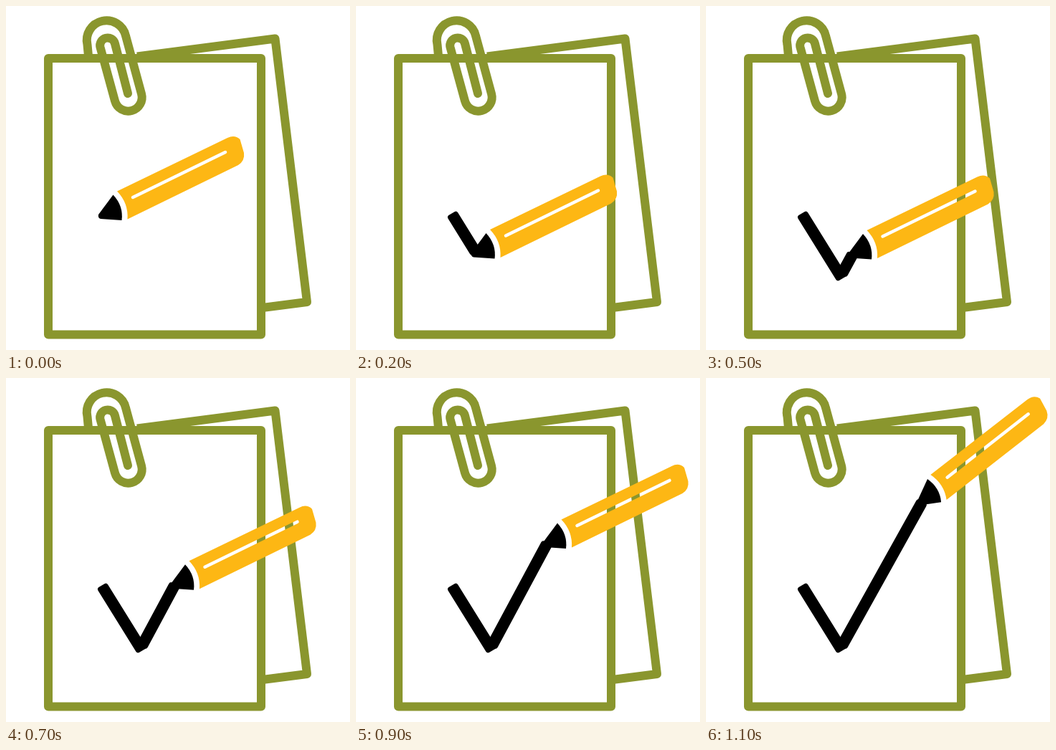
Write an HTML page that moves like this. It is 480 px wide and 480 px high and loops after 1.6 s.

```html
<!DOCTYPE html>
<html lang="en">
<head>
<meta charset="utf-8">
<title>Check mark</title>
<style>
  html, body { margin: 0; height: 100%; overflow: hidden; background: #fff; }
  svg { display: block; width: 100vw; height: 100vh; }
</style>
</head>
<body>
<svg viewBox="0 0 480 480">
  <mask id="slot" maskUnits="userSpaceOnUse" x="0" y="0" width="480" height="480">
    <path fill="#fff" d="M0 0H480V480H0Z"/>
    <path stroke="#000" stroke-width="4.5" stroke-linecap="round" d="M177 267L306 204"/>
  </mask>
  <g fill="none" stroke="#8a962e" stroke-width="12" stroke-linejoin="round">
    <path d="M183 70.5L375.5 45.5L420 413L358 421"/>
    <path d="M59 73H356V458.5H59Z"/>
    <path stroke-linecap="round" d="M115 70L113.500 54A27.300 27.300 0 0 1 167 41.500L189 122.500A19 19 0 0 1 152 132.500L131.500 57.500A10.500 10.500 0 0 1 152 52.500L170 122"/>
  </g>
  <rect id="down" height="16" rx="3.5"/>
  <rect id="up" height="16" rx="3.5"/>
  <g id="pencil">
    <path d="M149.500 263.500L129 291Q128 296 132 297L161.500 299Q164 279 149.500 263.500Z"/>
    <path fill="#fdb714" mask="url(#slot)" d="M155 258.500L309 184Q319 179 326.500 186L332 205Q333.500 216 324 222L169.500 297.500Q171 275 155 258.500Z"/>
  </g>
</svg>
<script>
const STEP = 100, LOOP = 1600, LAST = 11;
const TIP = [129, 295], START = [133.5, 289.5], DOWN_END = [190, 380.5], UP_START = [189, 375];
const byId = id => document.getElementById(id);

// Pencil offset and tilt for each drawing step
function pose(i) {
  if (i === 0) return [0, 0, 0];
  if (i < 4) return [4 + 14 * i, 8.5 + 22.5 * i, 0];
  if (i === 4) return [55, 84, 0];
  const k = i - 5, turn = Math.max(0, i - 9);
  return [69.5 + 15.5 * k + 2 * turn, 54.5 - 28.9 * k, -6 * turn];
}

// Lay a bar from point a to point b
function setBar(id, [ax, ay], [bx, by], shown) {
  const bar = byId(id), angle = Math.atan2(by - ay, bx - ax) * 180 / Math.PI;
  bar.setAttribute("width", shown ? Math.hypot(bx - ax, by - ay) : 0);
  bar.setAttribute("transform", `translate(${ax} ${ay}) rotate(${angle}) translate(0 -8)`);
}

function draw(now) {
  const i = Math.min(LAST, Math.floor(now % LOOP / STEP));
  const [dx, dy, tilt] = pose(i);
  const end = [TIP[0] + dx + 6.5, TIP[1] + dy - 4];
  setBar("down", START, i < 4 ? end : DOWN_END, i > 0);
  setBar("up", UP_START, end, i > 4);
  byId("pencil").setAttribute("transform", `translate(${dx} ${dy}) rotate(${tilt} ${TIP})`);
}

let begin;
function tick(now) {
  begin ??= now;
  draw(now - begin);
  requestAnimationFrame(tick);
}
draw(0);
requestAnimationFrame(tick);
</script>
</body>
</html>
```
